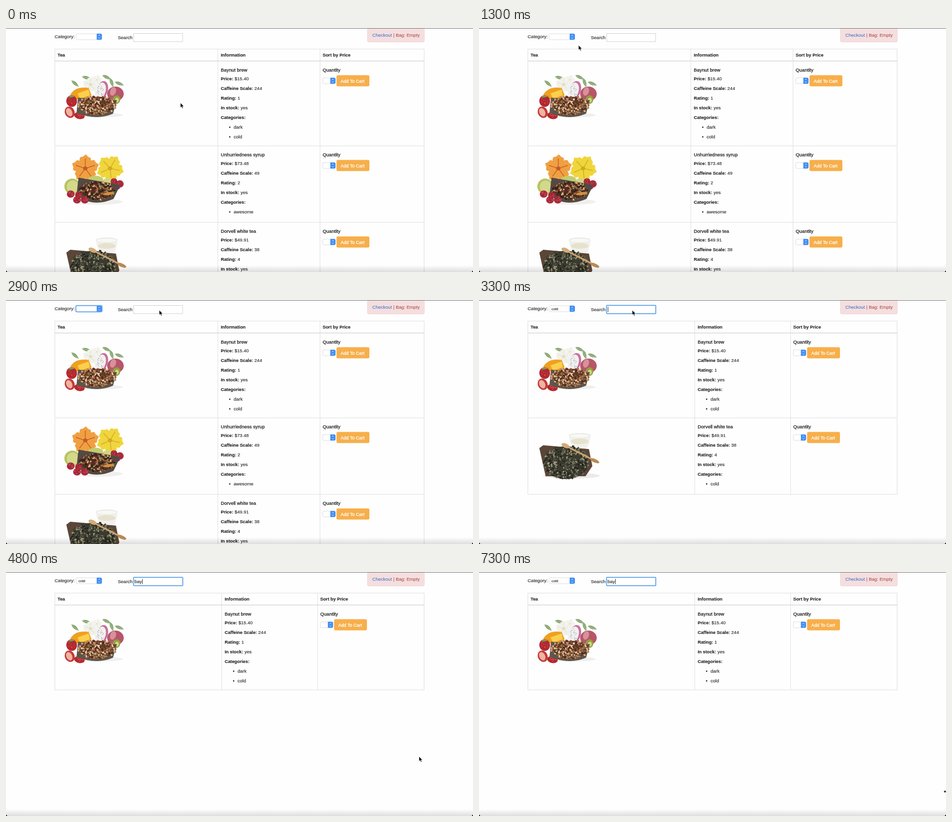
An HTML page for the animation above (7.4 s loop, 960x504 px).

```html
<!DOCTYPE html>
<html lang="en">
<head>
<meta charset="utf-8">
<title>Tea shop</title>
<style>
html, body { margin: 0; width: 100%; height: 100%; overflow: hidden; background: #fefefe; }
svg { display: block; width: 960px; height: 504px; }
text { font: 9.5px "Liberation Sans", Arial, sans-serif; fill: #222; stroke: #222; stroke-width: .12; white-space: pre; }
.b { font-size: 9.27px; font-weight: 700; }
.n { font-size: 9.8px; stroke-width: .3; }
.s { font-size: 7.5px; }
.btn { font-size: 9.3px; fill: #fff; stroke: #fff; stroke-width: .3; }
.bag { font-size: 9.55px; fill: #a33d3b; stroke: none; }
</style>
</head>
<body>
<svg id="stage" viewBox="0 0 960 504" xmlns="http://www.w3.org/2000/svg"></svg>
<script>
const LOOP = 7400, STEP = 100;
const stage = document.getElementById('stage');

const rect = (x, y, w, h, fill, extra = '') =>
  `<rect x="${x}" y="${y}" width="${w}" height="${h}" fill="${fill}" ${extra}/>`;
const text = (x, y, str, cls = '', extra = '') =>
  `<text x="${x}" y="${y}" class="${cls}" ${extra}>${str}</text>`;
const path = (d, fill, extra = '') => `<path d="${d}" fill="${fill}" ${extra}/>`;
const oval = (x, y, rx, ry, fill, turn = 0) =>
  `<ellipse cx="${x}" cy="${y}" rx="${rx}" ry="${ry}" fill="${fill}" transform="rotate(${turn} ${x} ${y})"/>`;
const line = (d, color = '#dedede', w = 1) =>
  path(d, 'none', `stroke="${color}" stroke-width="${w}"`);

function random(seed) {
  return () => (seed = (seed * 16807) % 2147483647) / 2147483647;
}

// Loose pieces scattered over an elliptical heap
function heap(cx, cy, rx, ry, count, colors, seed, size = 1.6) {
  const rnd = random(seed);
  let out = '';
  for (let i = 0; i < count; i++) {
    const a = rnd() * Math.PI * 2, r = Math.sqrt(rnd());
    const color = colors[Math.floor(rnd() * colors.length)];
    out += oval((cx + Math.cos(a) * r * rx).toFixed(1), (cy + Math.sin(a) * r * ry).toFixed(1),
      (size * (.9 + rnd() * .7)).toFixed(1), size * .85, color, Math.floor(rnd() * 180));
  }
  return out;
}

// Five wavy, pointed petals around a core
function flower(x, y, r, fill, shade, turn = 0) {
  let out = '';
  for (let i = 0; i < 5; i++) {
    out += `<g transform="translate(${x} ${y}) rotate(${turn + i * 72}) scale(${r / 10})">` +
      path('M0 0C-3 -2 -5 -5 -3.6 -8L-1.6 -8.4L.4 -10L2 -8.3L3.8 -7.4C4.6 -5 3 -2 0 0Z', fill) +
      line('M0 -1L0 -7', shade, .5) + '</g>';
  }
  return out + oval(x, y, r * .16, r * .14, shade);
}

const leaf = (x, y, turn) =>
  `<g transform="translate(${x} ${y}) rotate(${turn})">` + path('M-10 0Q-3 -7 10 0Q-2 6 -10 0Z', '#86a56c') +
  line('M-8 0H8', '#bccbab', .8) + '</g>';
const berry = (x, y, r) => oval(x, y, r, r * .95, '#a82a3a') + heap(x, y, r * .75, r * .7, 9, ['#cf6070', '#8a1c2c', '#c04456'], 5 + x, 1);
const strawberry = (x, y, w, h, turn) =>
  oval(x, y, w, h, '#b52a30', turn) + heap(x, y, w * .7, h * .7, 14, ['#de7d70', '#8c1d24'], 7 + x, .7) +
  oval(x, y - h * .8, w * .6, 2, '#7d9a58', turn);

// Product pictures, measured from the top of their row
const photos = [
  () => oval(190, 111, 50, 5, '#f0efed') +
    leaf(166, 34, 15) + leaf(207, 33, 25) + leaf(142, 46, 40) + leaf(233, 46, 20) + leaf(217, 44, 70) +
    flower(174, 48, 17, '#f1f2ea', '#dcdcc0') + flower(187, 38, 11, '#f4f4ee', '#e0e0c8', 20) +
    oval(225, 67, 17, 15, '#b5566a') + oval(220, 62, 6, 9, '#d99099', 20) +
    path('M132 69Q143 50 170 55L176 70Q162 82 145 78Z', '#f0a020') +
    path('M147 66L170 58L172 70L152 77Z', '#fbd04e') +
    oval(197, 60, 12, 20, '#c8709a', 18) + oval(194, 61, 10.5, 18, '#f1f0f1', 18) +
    heap(194, 61, 8, 14, 26, ['#77747a'], 9, .6) +
    oval(227, 79, 8, 9, '#94a03f', 20) + oval(228, 80, 4, 5, '#d2d58a') +
    strawberry(135, 82, 11, 12, -10) + oval(131, 105, 10, 12, '#c43a36', -25) +
    oval(130, 105, 6, 9, '#eeb4a2', -25) + strawberry(151, 112, 11, 7, 10) +
    path('M148 75L228 80L220 108Q186 123 145 106Z', '#5f554b') +
    oval(187, 91, 36, 18, '#5c3a28') +
    heap(187, 91, 39, 20, 300, ['#3d241b', '#e0c094', '#a3623a', '#7a2a25', '#ecdcba', '#5e3a28', '#c08a58', '#8a6a4a'], 31, 1.7),
  () => oval(188, 115, 52, 6, '#f0efed') +
    flower(163, 46, 29, '#f0a040', '#c05a2c') + flower(214, 46, 29, '#f0d53c', '#cfaa24', 30) +
    oval(136, 83, 16, 16, '#b8c460') + oval(137, 84, 12, 13, '#d3d98c') +
    oval(184, 70, 16, 9, '#c3cc70') + oval(209, 73, 10, 7, '#d0d684') +
    berry(222, 73, 7) + berry(234, 78, 8) + berry(229, 84, 6) +
    path('M149 65L235 80L221 109Q177 128 145 101Z', '#544a42') +
    oval(187, 92, 34, 17, '#4c2c20') +
    heap(187, 92, 36, 19, 240, ['#2c1c17', '#b0703a', '#dcc08c', '#772a24', '#513526', '#9c8a66', '#3e2a20'], 57, 1.8) +
    oval(211, 98, 12, 3, '#d09040', -8) +
    berry(133, 99, 8) + berry(146, 111, 8) + berry(162, 111, 8) + berry(149, 101, 7),
  () => oval(190, 119, 58, 6, '#eceae8') +
    path('M185 36Q187 56 197 64H219Q228 56 229 36Z', '#f1f0ec') +
    oval(207, 36, 22, 5, '#e4e2dc') + oval(207, 36.5, 20.5, 4, '#f8f8f5') + oval(207, 48, 18, 6, '#e6e2cc') +
    path('M132 56L226 64L233 99L219 120H137L124 62Z', '#5a4638') +
    oval(179, 92, 45, 34, '#3b3b30') +
    heap(179, 91, 47, 35, 420, ['#1e1f18', '#5c5d4a', '#85846a', '#3a3c30', '#a39c80', '#2c2d24'], 83, 1.7) +
    line('M176 56L238 88', '#cda26e', 3.5) + oval(238, 88, 10, 3.6, '#bc8a52', 24) + oval(178, 57, 9, 4.5, '#d4ac7a', 25)
];

const teas = [
  { name: 'Baynut brew', price: '$15.40', scale: 244, rating: 1, tags: ['dark', 'cold'], h: 175 },
  { name: 'Unhurriedness syrup', price: '$73.48', scale: 49, rating: 2, tags: ['awesome'], h: 158 },
  { name: 'Dorvell white tea', price: '$49.91', scale: 38, rating: 4, tags: ['cold'], h: 158 }
];

// Popup control: white box with a blue cap and two arrows
function select(x, y, w, cap) {
  const m = x + w - cap / 2, r = x + w, c = y + 6;
  return rect(x, y, w, 12, '#fff', 'rx="2.5" stroke="#d2d2d2" stroke-width=".8"') +
    path(`M${r - cap} ${y - .3}H${r - 2.5}Q${r} ${y - .3} ${r} ${y + 2.5}V${y + 9.5}Q${r} ${y + 12.3} ${r - 2.5} ${y + 12.3}H${r - cap}Z`, '#3c8cf2') +
    line(`M${m - 2} ${c - 1.5}l2 -2l2 2M${m - 2} ${c + 1.5}l2 2l2 -2`, '#fff', 1);
}

function row(i, top, c1, c2) {
  const tea = teas[i], x = c1 + 6, px = c2 + 5.5;
  const facts = [['Price:', tea.price], ['Caffeine Scale:', tea.scale], ['Rating:', tea.rating],
    ['In stock:', 'yes'], ['Categories:', '']];
  return `<g transform="translate(0 ${top})">` + photos[i]() +
    text(x, 21, tea.name, 'n') +
    facts.map(([k, v], n) => text(x, 39 + n * 20, `<tspan class="b">${k}</tspan> ${v}`)).join('') +
    tea.tags.map((t, n) => oval(x + 18.5, 136 + n * 20, 1.4, 1.4, '#222') + text(x + 26.5, 139 + n * 20, t)).join('') +
    text(px, 21, 'Quantity', 'n') + select(px + .2, 34, 26, 10.5) +
    rect(c2 + 33.9, 28.6, 67.6, 22.9, '#f7af4b', 'rx="3"') +
    text(c2 + 42.5, 43.5, 'Add To Cart', 'btn') + '</g>';
}

function table(id, c1, c2, list) {
  let y = 69, out = '';
  for (const i of list) {
    out += row(i, y, c1, c2);
    y += teas[i].h;
    out += line(`M100 ${y - .5}H860`);
  }
  return `<g id="${id}">` + out +
    line(`M100 43.5H860M100.5 43V${y}M859.5 43V${y}M${c1} 43V${y}M${c2} 43V${y}`) +
    line('M100 68.3H860', '#d8d8d8', 1.4) +
    text(106, 59, 'Tea', 'b') + text(c1 + 6, 59, 'Information', 'b') + text(c2 + 5.5, 59, 'Sort by Price', 'b') + '</g>';
}

const options = ['dark', 'cold', 'awesome', 'dry', 'hot', 'summer', 'lucid', 'warm', 'winter', 'spring'];
const menu = '<g id="menu">' +
  rect(136.5, 10.5, 62, 124.5, '#000', 'rx="3" opacity=".2" filter="url(#soft)"') +
  rect(137, 10, 61, 123.5, '#f1f1f1', 'rx="3" opacity=".96" stroke="#c8c8c8" stroke-width=".6"') +
  rect(137, 0, 61, 10.7, '#3982f4', 'id="mark"') +
  line('M141 18l1.8 2.4l3.2 -5.6', '#222', 1.2) +
  options.map((o, i) => text(151, (32 + i * 10.72).toFixed(1), o, 's')).join('') + '</g>';

const ring = (id, x, y, w, h, r) =>
  rect(x, y, w, h, 'none', `id="${id}" rx="${r}" stroke="#69a9f0" stroke-width="2"`);

stage.innerHTML = `<defs>
  <filter id="soft" x="-20%" y="-20%" width="140%" height="140%"><feGaussianBlur stdDeviation="3"/></filter>
  <linearGradient id="dim" x2="0" y2="1"><stop stop-opacity="0"/>
  <stop offset="1" stop-opacity=".13"/></linearGradient></defs>` +
  rect(0, 0, 960, 504, '#fefefe') +
  table('all', 435.5, 645.5, [0, 1, 2]) +
  table('cold', 443.5, 640.5, [0, 2]) +
  table('one', 443.5, 640.5, [0]) +
  text(100, 21, 'Category:') + select(144, 12, 53, 10.5) + text(149, 21, 'cold', 's', 'id="choice"') +
  ring('pickRing', 143.5, 11.5, 54, 13, 3) +
  text(230, 23, 'Search') + rect(262.5, 11.5, 100.5, 16.5, '#fff', 'stroke="#cfcfcf"') +
  ring('findRing', 262.2, 11, 101.2, 17.2, 1) +
  text(264.3, 23, '', '', 'id="query"') + rect(0, 14, .9, 11, '#222', 'id="caret"') +
  rect(743, -4, 117, 33, '#f4dfdf', 'rx="3" stroke="#ecced2" stroke-width=".8"') +
  text(753, 18, '<tspan style="fill:#3468bd">Checkout</tspan> | Bag: Empty', 'bag') +
  menu +
  rect(0, 490, 960, 14, 'url(#dim)') +
  rect(0, 0, 960, 1, '#6b6b6b') + path('M0 501L3 504H0ZM960 501L957 504H960Z', '#111') +
  `<g id="arrow">${path('M0 0V10L2.3 8L4 11.8L5.7 11L4.1 7.4H7.2Z', '#000', 'stroke="#fff" stroke-width=".7"')}</g>` +
  `<g id="sizer">${path('M955.5 453.5l3 -2.7v1.9h1.5v1.6h-1.5v1.9Z', '#111')}</g>`;

const $ = id => document.getElementById(id);
const show = (id, on) => { $(id).style.display = on ? '' : 'none'; };

const moves = [[0, 358.5, 154.5], [700, 358.5, 154.5], [1300, 204.5, 35.5], [1600, 190, 17], [1800, 190, 17],
  [2300, 176.5, 38.5], [2500, 176.5, 38.5], [2900, 315, 21], [4400, 315, 21], [4800, 849, 381], [5000, 957, 453]];

function pointer(t) {
  const n = moves.findIndex(m => m[0] > t);
  if (n < 0) return moves[moves.length - 1].slice(1);
  const [t0, x0, y0] = moves[n - 1], [t1, x1, y1] = moves[n];
  const u = (t - t0) / (t1 - t0), e = u * u * (3 - 2 * u);
  return [x0 + (x1 - x0) * e, y0 + (y1 - y0) * e];
}

function draw(t) {
  const [x, y] = pointer(t);
  const open = t >= 1700 && t < 2500, picked = t >= 3100, find = t >= 3200;
  const query = 'bay'.slice(0, (t >= 3500) + (t >= 3800) + (t >= 4200));

  show('all', !picked);
  show('cold', picked && !query);
  show('one', query);
  show('choice', picked);
  show('menu', open);
  const item = Math.max(0, Math.floor((y - 13.5) / 10.72));
  $('mark').setAttribute('y', 13.5 + item * 10.72);
  show('pickRing', t >= 2500 && !find);
  show('findRing', find);
  show('caret', find);
  $('query').textContent = query;
  $('caret').setAttribute('x', 264.8 + $('query').getComputedTextLength());

  show('arrow', t < 3400 || (t >= 4400 && t < 5000));
  show('sizer', t >= 5000);
  $('arrow').setAttribute('transform', `translate(${x.toFixed(1)} ${y.toFixed(1)})`);
}

const start = performance.now();
function tick() {
  const t = (performance.now() - start) % LOOP;
  draw(Math.floor(t / STEP) * STEP);
  requestAnimationFrame(tick);
}
draw(0);
requestAnimationFrame(tick);
</script>
</body>
</html>
```
